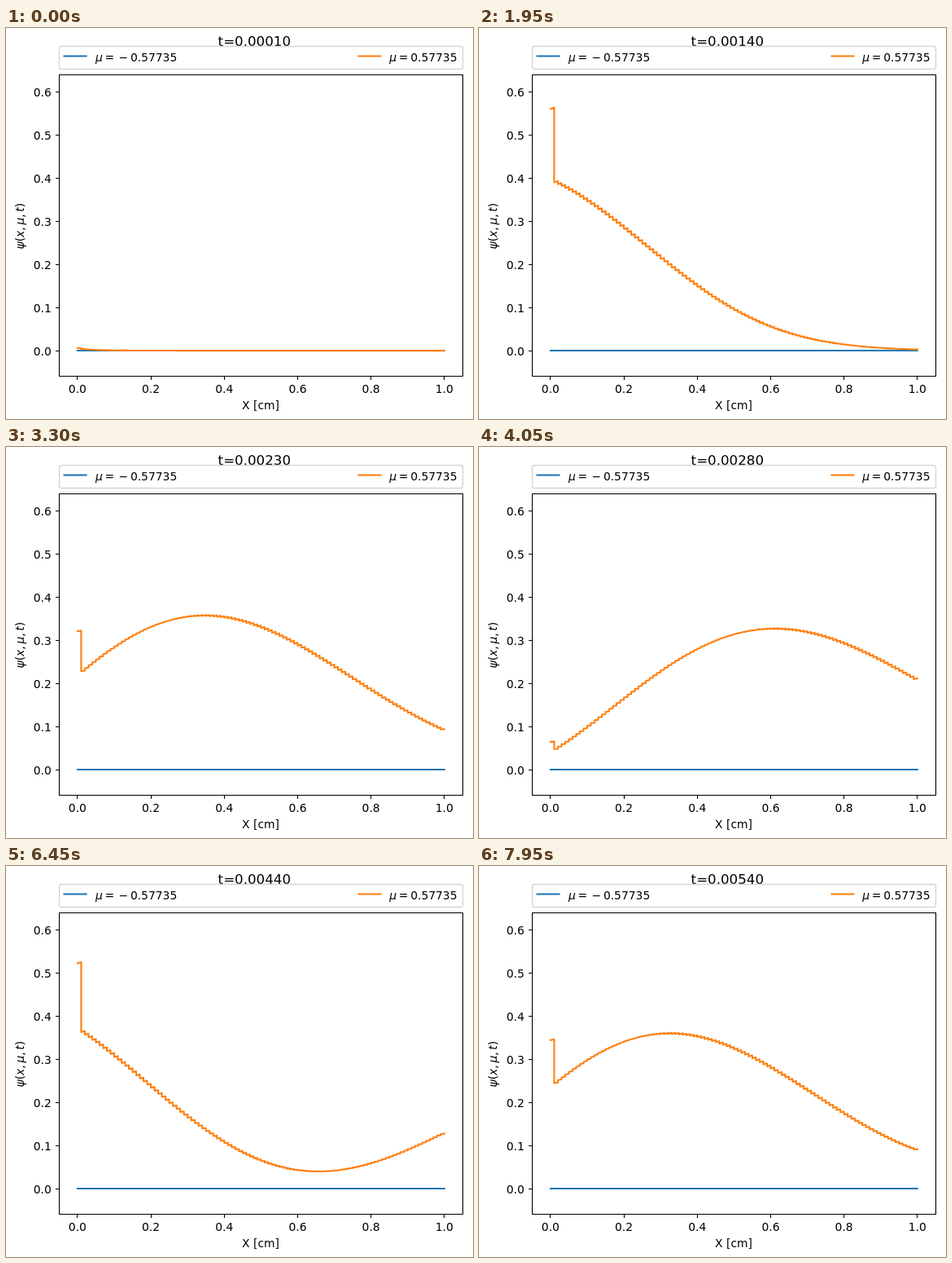
Animation, 574 px wide and 480 px high, one loop 8 s. Source, as an HTML page with a canvas:

```html
<!DOCTYPE html>
<html lang="en">
<head>
<meta charset="utf-8">
<title>Transport wave</title>
<style>
  html, body { margin: 0; width: 574px; height: 480px; overflow: hidden; background: #fff; }
  canvas { display: block; }
</style>
</head>
<body>
<canvas id="plot" width="574" height="480"></canvas>
<script>
const ctx = document.getElementById('plot').getContext('2d');
const LOOP = 8000, STEP = 150, COUNT = 54;
const BLUE = '#1f77b4', ORANGE = '#ff7f0e';
const FONT = '"DejaVu Sans", sans-serif', SIZE = 13.89;

// Transport in ms and cm: backward Euler in time, box scheme in space
const CELLS = 100, H = 1 / CELLS, DT = 0.1;
const MU = 0.57735, SPEED = 0.529, LOSS = 0.087, INFLOW = 0.4055, TILT = 0.007;

const X = v => 87.9 + 450.9 * v;
const Y = v => 396.1 - 529.2 * v;
const snap = v => Math.floor(v) + 0.5;

function solve() {
  const states = [];
  const flow = SPEED / H, sink = (1 / DT + LOSS) / 2;
  let old = new Float64Array(CELLS);
  for (let n = 1; n <= COUNT; n++) {
    const pulse = Math.sin(n * DT) ** 2;
    const now = new Float64Array(CELLS);
    now[0] = INFLOW * pulse;
    for (let j = 1; j < CELLS; j++) {
      const carried = (old[j] + old[j - 1]) / (2 * DT);
      now[j] = Math.max(0, (carried + (flow - sink) * now[j - 1]) / (flow + sink));
    }
    states.push({ edge: MU * pulse, psi: now });
    old = now;
  }
  return states;
}

function line(points, color, width = 2.08) {
  ctx.beginPath();
  for (const [x, y] of points) ctx.lineTo(x, y);
  ctx.strokeStyle = color;
  ctx.lineWidth = width;
  ctx.stroke();
}

function text(s, x, y, align = 'center', size = SIZE) {
  ctx.font = `${size}px ${FONT}`;
  ctx.textAlign = align;
  ctx.fillText(s, x, y);
}

// Letters are slanted, a blank is a thin math space
function math(s, x, y) {
  ctx.textAlign = 'left';
  for (const c of s) {
    if (c === ' ') { x += 2.7; continue; }
    ctx.font = `${/[a-zμψ]/.test(c) ? 'italic ' : ''}${SIZE}px ${FONT}`;
    ctx.fillText(c, x, y);
    x += ctx.measureText(c).width;
  }
}

function axes() {
  ctx.fillStyle = '#000';
  for (let i = 0; i <= 5; i++) {
    const x = snap(X(i / 5));
    line([[x, 428], [x, 432]], '#000', 1.11);
    text((i / 5).toFixed(1), X(i / 5), 448);
  }
  for (let i = 0; i <= 6; i++) {
    const y = snap(Y(i / 10));
    line([[65, y], [61, y]], '#000', 1.11);
    text((i / 10).toFixed(1), 55.8, y + 5, 'right');
  }
  ctx.strokeStyle = '#000';
  ctx.lineWidth = 1.11;
  ctx.strokeRect(65.5, 57.5, 496, 370);
  text('X [cm]', 313, 468);
  ctx.save();
  ctx.translate(22, 271.5);
  ctx.rotate(-Math.PI / 2);
  math('ψ(x, μ, t)', 0, 0);
  ctx.restore();
}

function legend() {
  ctx.beginPath();
  ctx.roundRect(65.5, 22.5, 496, 28, 2.8);
  ctx.strokeStyle = 'rgba(204,204,204,.8)';
  ctx.lineWidth = 1.39;
  ctx.stroke();
  line([[71.5, 34.5], [98.5, 34.5]], BLUE);
  line([[433.5, 34.5], [460.5, 34.5]], ORANGE);
  math('μ =  − 0.57735', 110, 40.5);
  math('μ = 0.57735', 471.3, 40.5);
}

function wave({ edge, psi }) {
  const points = [[X(0), Y(edge)], [X(H), Y(edge * 1.0052)]];
  for (let i = 1; i < CELLS; i++) {
    const mid = (psi[i - 1] + psi[i]) / 2;
    points.push([X(i * H), Y(mid * (1 - TILT / 2))],
                [X((i + 1) * H), Y(mid * (1 + TILT / 2))]);
  }
  line(points, ORANGE);
}

const states = solve();

function draw(k) {
  ctx.fillStyle = '#fff';
  ctx.fillRect(0, 0, 574, 480);
  ctx.lineJoin = 'round';
  ctx.lineCap = 'square';
  line([[X(0), 396], [X(1), 396]], BLUE);
  wave(states[k]);
  ctx.lineCap = 'butt';
  axes();
  text(`t=${((k + 1) / 10000).toFixed(5)}`, 305.3, 22, 'center', 16.67);
  ctx.lineCap = 'square';
  legend();
}

const start = performance.now();
function tick() {
  const t = (performance.now() - start) % LOOP;
  draw(Math.min(COUNT - 1, Math.floor(t / STEP)));
  requestAnimationFrame(tick);
}
tick();
</script>
</body>
</html>
```
